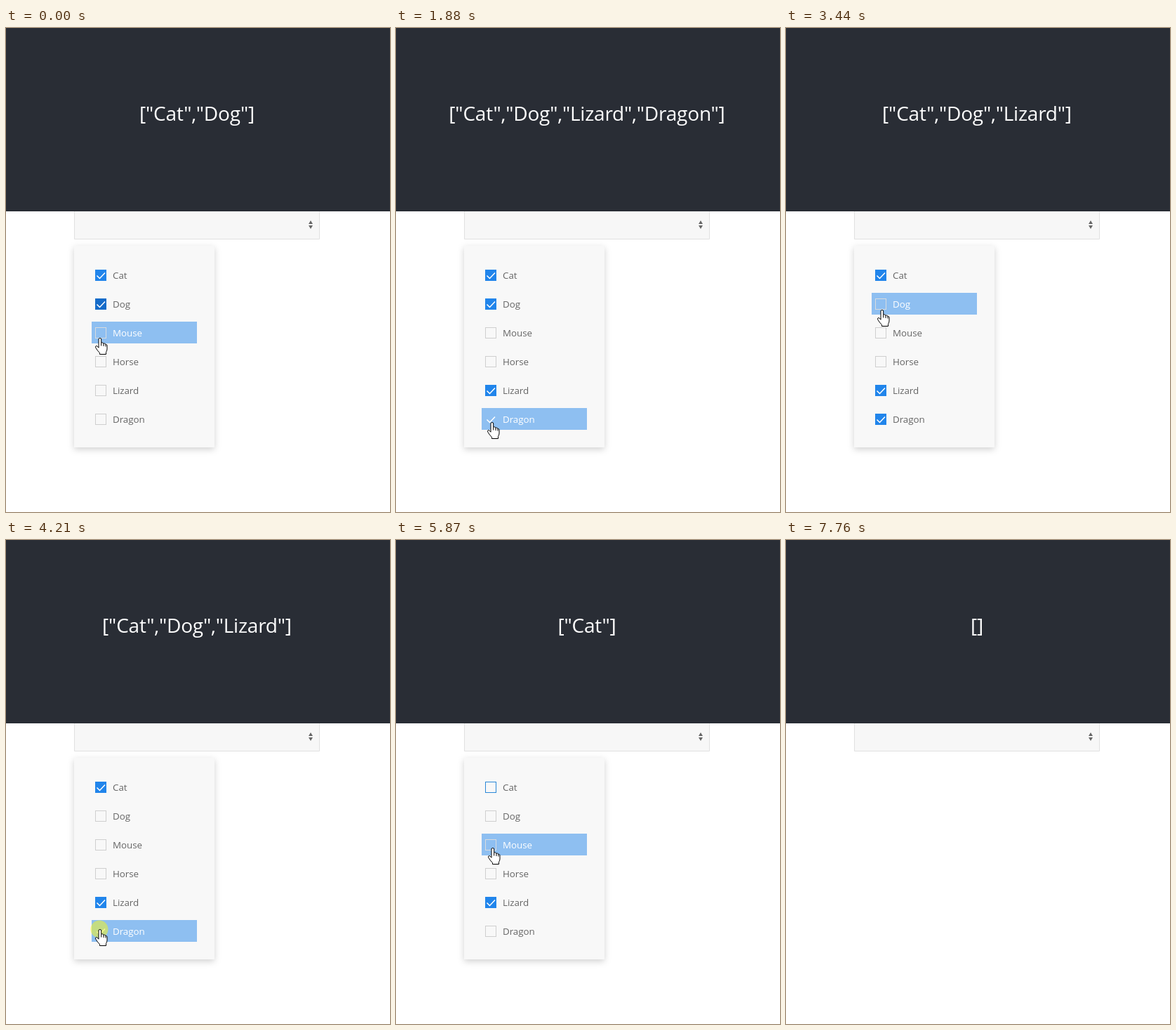
An HTML page that plays this animation: 547x689 px, repeating every 8.08 s.

```html
<!DOCTYPE html>
<html lang="en">
<head>
<meta charset="utf-8">
<title>Checkbox dropdown</title>
<style>
  html, body { margin: 0; width: 100%; height: 100%; overflow: hidden; background: #fff; }
  svg { display: block; }
  text { font-family: "Open Sans", "Noto Sans", sans-serif; }
  #value { font-size: 28px; letter-spacing: -.2px; text-anchor: middle; fill: #fff; }
  .label { font-size: 13.4px; letter-spacing: -.05px; }
  .card { fill: #f8f8f8; filter: drop-shadow(0 3px 5px rgba(0, 0, 0, .18)); }
  .tick { fill: none; stroke: #fff; stroke-width: 1.5; }
  .cursor path { fill: #fff; stroke: #000; stroke-linejoin: round; }
</style>
</head>
<body>
<svg width="547" height="689" viewBox="0 0 547 689">
  <path d="M97.5 255V300.5H446.5V255" fill="#f7f7f7" stroke="#e1e1e1"/>
  <path d="M431 279L434 274L437 279ZM431 281H437L434 286Z" fill="#666"/>
  <rect width="547" height="261" fill="#292d35"/>
  <text id="value" x="272" y="132"></text>
  <g id="panel">
    <rect class="card" x="97" y="310" width="200" height="287"/>
    <g id="rows"></g>
  </g>
  <circle id="press" r="12.5" fill="#fafa14" fill-opacity=".5"/>
  <g id="hand" class="cursor">
    <path d="M-2 14.2V2Q-2 .5 -.2 .5Q1.7 .5 1.7 2V7.5Q2 6.7 3.3 6.8Q5 7 5 8.8Q5.3 7.7 6.7 8Q8 8.5 8 10Q8.5 9 9.3 9.6Q10 10 10 11V16Q10 18 8.5 20.5V23.5H-.5V21.5Q-4 18 -6 14.5Q-7 12.5 -6 11.8Q-4.5 11 -3 13Z"/>
    <path d="M1.7 7.5V11.5M5 8.8V12M8 10V12.5"/>
  </g>
  <g id="arrow" class="cursor">
    <path d="M.5 .5V16.5L4.2 13.2L6.6 18.7L8.8 17.8L6.4 12.3H11.5Z"/>
  </g>
</svg>
<script>
const LOOP = 8080, CLOSE_START = 7190, CLOSE_END = 7420;
const names = ["Cat", "Dog", "Mouse", "Horse", "Lizard", "Dragon"];
const byId = id => document.getElementById(id);
const rowY = i => 352 + 41 * i;

// Bursts of screen updates: first, last, count.
const ticks = [0];
for (const [first, last, count] of [
  [100, 890, 8], [990, 1650, 7], [1880, 1880, 1], [2200, 2980, 8],
  [3100, 3880, 8], [3980, 3980, 1], [4210, 4970, 8], [5090, 5870, 8],
  [5990, 6310, 4], [6640, 7420, 8], [7520, 7760, 3]
]) for (let i = 0; i < count; i++) ticks.push(first + (last - first) * i / Math.max(1, count - 1));

// Pointer path: time, x, y.
const path = [
  [0, 134, 441], [340, 136, 517], [760, 136, 518], [890, 140, 530],
  [990, 145, 551], [1100, 138, 560], [1210, 136, 562], [1875, 136, 562],
  [1880, 137, 561], [2195, 137, 561], [2757, 144, 396], [2980, 137, 396],
  [3420, 137, 396], [3880, 134, 550], [3980, 134, 554], [4530, 134, 554],
  [5090, 150, 360], [5310, 137, 354], [5640, 137, 354], [5870, 138, 438],
  [6310, 135, 510], [6960, 135, 510], [7420, 489, 606], [7640, 514, 670],
  [7760, 530, 720], [LOOP, 530, 720]
];
const arrowSpans = [[990, 1090], [5080, 5200], [7060, LOOP]];

// Mouse presses: time, row.
const presses = [[545, 4], [1205, 5], [3095, 1], [4205, 5], [5420, 0], [6635, 4]];
const RELEASE = 105, GLOW = 215;

byId("rows").innerHTML = names.map((name, i) => {
  const y = rowY(i);
  return `<g><rect class="hover" x="122" y="${y - 16}" width="150" height="31" fill="#8ebff1"/>
    <rect class="box" x="127.5" y="${y - 7.5}" width="15" height="15"/>
    <path class="tick" d="M129.5 ${y + .5}l4 4l7.5 -8"/>
    <text class="label" x="152" y="${y + 5}">${name}</text></g>`;
}).join("");
const rows = [...byId("rows").children].map(g => ({
  hover: g.querySelector(".hover"), box: g.querySelector(".box"),
  tick: g.querySelector(".tick"), label: g.querySelector(".label")
}));

const show = (el, on) => el.setAttribute("visibility", on ? "visible" : "hidden");
const moveTo = (el, x, y) => el.setAttribute("transform", `translate(${x} ${y})`);

function pointerAt(t) {
  const n = path.findIndex(p => p[0] > t);
  const [t0, x0, y0] = path[n - 1], [t1, x1, y1] = path[n];
  const k = (t - t0) / (t1 - t0);
  return [Math.round(x0 + (x1 - x0) * k), Math.round(y0 + (y1 - y0) * k)];
}

function stateAt(t) {
  const checked = new Set([0, 1]), value = ["Cat", "Dog"];
  let focus = 1, glow = false;
  for (const [start, row] of presses) {
    if (t < start) break;
    focus = row;
    glow = t < start + GLOW;
    if (t < start + RELEASE) break;
    // Unchecking any row drops the last value.
    if (checked.delete(row)) value.pop();
    else { checked.add(row); value.push(names[row]); }
  }
  return { checked, value, focus, glow };
}

function boxColors(checked, focused, hovered) {
  if (hovered) return checked ? ["none", "none"] : ["none", "#d8dbde"];
  if (checked) return focused ? ["#156bc9", "#156bc9"] : ["#2185eb", "#2185eb"];
  return ["none", focused ? "#2a88d8" : "#cfcfcf"];
}

function render(time) {
  const t = ticks.findLast(tick => tick <= time);
  const [x, y] = pointerAt(t);
  const { checked, value, focus, glow } = stateAt(t);
  byId("value").textContent = JSON.stringify(value);

  rows.forEach((row, i) => {
    const dy = y - rowY(i);
    const hovered = x >= 122 && x < 272 && dy >= -16 && dy < 15;
    const [fill, stroke] = boxColors(checked.has(i), focus === i, hovered);
    row.hover.setAttribute("opacity", hovered ? 1 : 0);
    row.box.setAttribute("fill", fill);
    row.box.setAttribute("stroke", stroke);
    row.tick.setAttribute("opacity", checked.has(i) ? 1 : 0);
    row.label.setAttribute("fill", hovered ? "#fff" : "#666");
  });

  const closing = (t - CLOSE_START) / (CLOSE_END - CLOSE_START);
  byId("panel").setAttribute("opacity", Math.min(1, Math.max(0, 1 - closing)));

  const arrow = arrowSpans.some(([from, to]) => t >= from && t < to);
  show(byId("arrow"), arrow);
  show(byId("hand"), !arrow);
  show(byId("press"), glow);
  moveTo(byId("arrow"), x, y);
  moveTo(byId("hand"), x, y);
  moveTo(byId("press"), x - 1, y);
}

const begin = performance.now();
function loop() {
  render((performance.now() - begin) % LOOP);
  requestAnimationFrame(loop);
}
loop();
</script>
</body>
</html>
```
